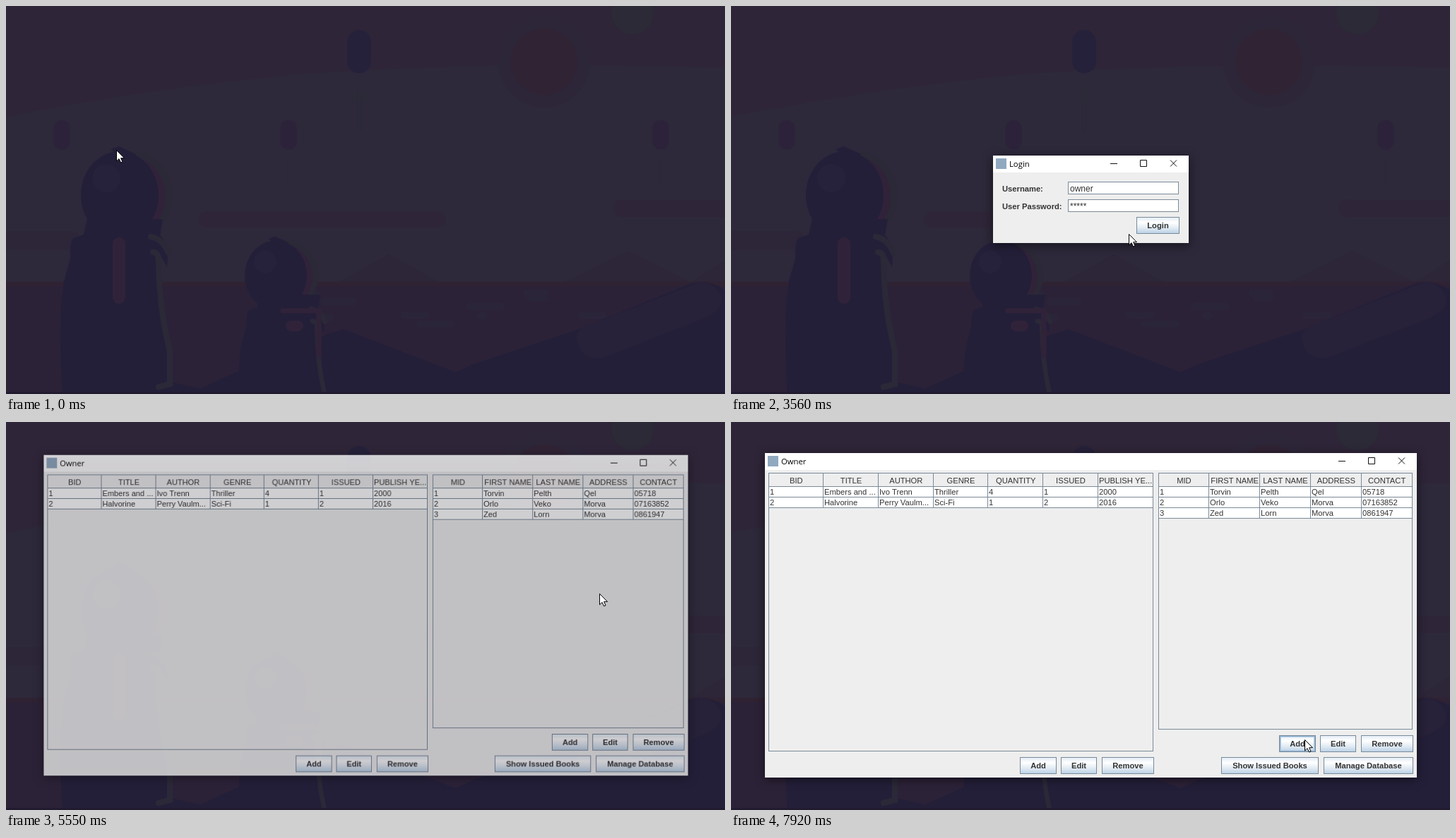
An HTML page with a canvas for the animation above (8000 ms loop, 1018 by 550 pixels).

```html
<!DOCTYPE html>
<html lang="en">
<head>
<meta charset="utf-8">
<title>Library login</title>
<style>
html, body { margin: 0; width: 100%; height: 100%; overflow: hidden; background: #2d293b; }
canvas { display: block; }
</style>
</head>
<body>
<canvas id="stage" width="1018" height="550"></canvas>
<script>
const W = 1018, H = 550, LOOP = 8000;
const BORDER = '#7a8a99', PANEL = '#eeeeee', INK = '#333333';
const SANS = '"Liberation Sans", Arial, sans-serif';
const PLAIN = '11.2px ' + SANS, BOLD = 'bold 11.2px ' + SANS, INPUT = '12px ' + SANS;
const TITLE = '11.3px "Open Sans", "Noto Sans", sans-serif';
const DARK = '#241f39', RIM = '#2b2937', RED = '#302339';

const stage = document.getElementById('stage').getContext('2d');
const makeLayer = () => Object.assign(document.createElement('canvas'), { width: W, height: H }).getContext('2d');
const scene = makeLayer(), layer = makeLayer();
const clamp = (v, lo = 0, hi = 1) => Math.min(hi, Math.max(lo, v));

// ---------- wallpaper ----------
function paintScene(c) {
  let seed = 7;
  const random = (lo, hi) => {
    seed = seed * 16807 % 2147483647;
    return lo + (hi - lo) * seed / 2147483647;
  };
  const fill = (color, d) => { c.fillStyle = color; c.fill(new Path2D(d)); };
  const line = (color, width, d) => {
    c.strokeStyle = color; c.lineWidth = width; c.lineCap = 'round'; c.stroke(new Path2D(d));
  };
  const oval = (color, x, y, rx, ry = rx) => {
    c.fillStyle = color; c.beginPath(); c.ellipse(x, y, rx, ry, 0, 0, 7); c.fill();
  };
  const pill = (color, x, y, w, h) => {
    c.fillStyle = color; c.beginPath(); c.roundRect(x, y, w, h, Math.min(w, h) / 2); c.fill();
  };
  const rocket = (color, x, y, w) => {
    pill(color, x - w / 2, y, w, w * 1.8);
    line('#2c2939', w / 7, `M${x} ${y + w * 2.6}v${w * 1.6}`);
  };
  const hill = (x, y, w) => fill('#2d2538', `M${x - w} 391L${x} ${y}L${x + w} 391Z`);
  const figure = (x, y, size, lean) => {
    c.save();
    c.translate(x, y);
    c.scale(size, size);
    oval(RIM, 16, 0, 59, 62);
    oval(RED, 11, 2, 54, 58);
    oval(DARK, 0, 0, 55, 62);
    oval('#27223b', -19, -24, 20);
    fill(DARK, 'M-13 -65L-1 -69L23 -58L9 -48Z');
    c.translate(lean, 0);
    fill(DARK, 'M-46 34H61L57 57Q71 70 67 102L53 77V102Q59 172 75 225L67 237L75 290H-81Q-88 172 -79 122L-70 90Q-71 60 -63 60L-51 56Z');
    line(RIM, 8, 'M44 59Q61 62 69 82M47 81Q56 81 55 96Q56 162 71 221V268L55 272');
    c.restore();
  };

  c.fillStyle = '#2e2538'; c.fillRect(0, 0, W, H);
  fill('#2d283a', 'M0 157Q200 117 400 98Q560 84 800 84L1018 87V391H0Z');
  oval('#2d2639', 762, 79, 65);
  oval('#302334', 762, 79, 47);
  oval('#2c2a37', 887, 10, 30);
  oval('#2c2a38', 500, 128, 10);
  rocket('#26213a', 500, 34, 34);
  for (const x of [79, 400, 927]) rocket('#2c233a', x, 162, 23);

  pill('#2e2638', 273, 291, 350, 23);
  pill('#2e2538', 860, 274, 200, 25);
  pill('#2d2639', -20, 319, 125, 27);
  hill(542, 352, 70);
  hill(880, 347, 88);
  hill(1040, 347, 70);

  c.fillStyle = '#2c2238'; c.fillRect(0, 391, W, 159);
  c.fillStyle = '#2f2232'; c.fillRect(0, 391, W, 6);
  for (let i = 0; i < 12; i++) pill('#2b253a', random(200, 860), random(395, 450), random(12, 58), 11);

  fill(DARK, 'M230 532L275 542L330 517L455 465L478 458L637 519L660 508L808 459L965 395Q990 385 1018 402V550H230Z');
  fill('#272139', 'M808 469Q810 456 830 450L984 391Q1006 394 1012 412Q1016 430 990 442L845 499Q810 502 808 469Z');

  figure(161, 268, 1, 0);
  pill(RED, 151, 328, 18, 94);
  figure(382, 382, .8, 18);
  line(RED, 7, 'M392 432H443V496');
  pill(RED, 396, 446, 25, 15);
  c.fillStyle = '#221b30'; c.fillRect(0, 547, W, 3);
}

// ---------- widgets ----------
function text(c, s, x, y, font = PLAIN, color = INK, align = 'left') {
  c.font = font; c.fillStyle = color; c.textAlign = align;
  c.fillText(s, x, y);
}

function frame(c, x, y, w, h, color = BORDER) {
  c.strokeStyle = color; c.lineWidth = 1;
  c.strokeRect(x + .5, y + .5, w - 1, h - 1);
}

function box(c, x, y, w, h, fill) {
  c.fillStyle = fill; c.fillRect(x, y, w, h);
  frame(c, x, y, w, h);
}

function button(c, label, x, y, w, tip) {
  const h = 24, shade = c.createLinearGradient(0, y, 0, y + h);
  ['#e1ebf5', '#ffffff', '#e0eaf3', '#b8cfe5'].forEach((color, i) => shade.addColorStop(i / 3, color));
  box(c, x, y, w, h, shade);
  if (tip.x >= x && tip.x < x + w && tip.y >= y && tip.y < y + h) {
    frame(c, x + 1, y + 1, w - 2, h - 2, '#8fb0d0');
    frame(c, x + 2, y + 2, w - 4, h - 4, '#b8cfe5');
  }
  text(c, label, x + w / 2, y + 16, BOLD, INK, 'center');
}

// Lays buttons out from the right edge, each as wide as its label needs.
function buttonRow(c, right, y, tip, ...labels) {
  c.font = BOLD;
  for (const label of labels.reverse()) {
    const w = Math.ceil(c.measureText(label).width * 1.03 + 29);
    button(c, label, Math.floor(right - w), y, w, tip);
    right -= w + 6.5;
    c.font = BOLD;
  }
}

function windowFrame(c, title, x, y, w, h) {
  c.fillStyle = PANEL; c.fillRect(x, y, w, h);
  c.fillStyle = '#ffffff'; c.fillRect(x, y, w, 24);
  c.fillStyle = '#91a9c0'; c.fillRect(x + 4, y + 4, 15, 15);
  text(c, title, x + 23, y + 16, TITLE, '#000000');
  const r = x + w, m = y + 11.5;
  c.strokeStyle = '#111111'; c.lineWidth = 1;
  c.beginPath();
  c.moveTo(r - 111, m); c.lineTo(r - 101, m);
  c.rect(r - 68.5, m - 5, 9, 9);
  c.moveTo(r - 26, m - 5); c.lineTo(r - 17, m + 4);
  c.moveTo(r - 17, m - 5); c.lineTo(r - 26, m + 4);
  c.stroke();
}

function table(c, x, y, w, h, heads, rows) {
  const step = (w - 1) / heads.length, rowH = 15, top = y + 19, bodyH = rows.length * rowH;
  const edge = i => Math.floor(x + i * step);
  frame(c, x, y, w, h);
  c.fillStyle = '#ffffff'; c.fillRect(x + 1, top, w - 2, bodyH);
  c.fillStyle = BORDER;
  for (let r = 0; r <= rows.length; r++) c.fillRect(x, top + r * rowH, w, 1);
  heads.forEach((head, i) => {
    c.fillStyle = BORDER; c.fillRect(edge(i + 1), y, 1, 20 + bodyH);
    text(c, head, x + (i + .5) * step + .5, y + 15, PLAIN, INK, 'center');
    rows.forEach((row, r) => text(c, row[i], edge(i) + 2, top + 12 + r * rowH));
  });
}

function field(c, y, label, value, caret) {
  text(c, label, 384, y + 14, BOLD);
  box(c, 477, y, 157, 18, '#ffffff');
  text(c, value, 480, y + 14, INPUT);
  if (!caret) return;
  c.fillStyle = '#000000';
  c.fillRect(480 + Math.round(c.measureText(value).width), y + 2, 1, 15);
}

// ---------- windows ----------
const keysSince = (t, start, gap) => clamp(Math.floor((t - start) / gap), 0, 5);

// A first password attempt is corrected, erased and typed again.
function starCount(t) {
  if (t < 1610) return 0;
  if (t < 2280) return t < 2010 ? 4 : 3;
  return keysSince(t, 2360, 80);
}

function loginWindow(c, t, tip) {
  windowFrame(c, 'Login', 371, 212, 277, 124);
  const blinkOn = t < 2760 || (t - 2760) % 1000 < 500;
  field(c, 249, 'Username:', 'owner'.slice(0, keysSince(t, 855, 85)), t >= 610 && t < 1350);
  field(c, 274, 'User Password:', '*'.repeat(starCount(t)), t >= 1350 && blinkOn);
  buttonRow(c, 635, 299, tip, 'Login');
}

function mainWindow(c, t, tip) {
  windowFrame(c, 'Owner', 48, 44, 923, 460);
  table(c, 53, 72, 545, 395,
    ['BID', 'TITLE', 'AUTHOR', 'GENRE', 'QUANTITY', 'ISSUED', 'PUBLISH YE...'],
    [['1', 'Embers and ...', 'Ivo Trenn', 'Thriller', '4', '1', '2000'],
     ['2', 'Halvorine', 'Perry Vaulm...', 'Sci-Fi', '1', '2', '2016']]);
  table(c, 605, 72, 360, 364,
    ['MID', 'FIRST NAME', 'LAST NAME', 'ADDRESS', 'CONTACT'],
    [['1', 'Torvin', 'Pelth', 'Qel', '05718'],
     ['2', 'Orlo', 'Veko', 'Morva', '07163852'],
     ['3', 'Zed', 'Lorn', 'Morva', '0861947']]);
  buttonRow(c, 599, 475, tip, 'Add', 'Edit', 'Remove');
  buttonRow(c, 966, 444, tip, 'Add', 'Edit', 'Remove');
  buttonRow(c, 966, 475, tip, 'Show Issued Books', 'Manage Database');
}

// Draws a window as one layer, faded and scaled about its centre by `shown` (0 to 1).
function present(paint, shown, t, tip) {
  if (shown <= 0) return;
  const cx = 509.5, cy = 274, s = .943 + .057 * shown;
  layer.clearRect(0, 0, W, H);
  paint(layer, t, tip);
  stage.save();
  stage.globalAlpha = shown;
  stage.shadowColor = 'rgba(0,0,0,.5)';
  stage.shadowBlur = 14;
  stage.shadowOffsetY = 3;
  stage.translate(cx, cy);
  stage.scale(s, s);
  stage.drawImage(layer.canvas, -cx, -cy);
  stage.restore();
}

// ---------- pointer ----------
const stops = [
  [0, 156, 204], [3150, 156, 204], [3560, 563, 323], [3980, 586, 321], [4460, 586, 321], [5000, 821, 245],
  [5150, 821, 245], [5410, 849, 261], [5550, 840, 243], [5690, 789, 215], [6170, 591, 160], [6600, 850, 451],
  [7200, 640, 106], [7640, 815, 451], [7740, 790, 411], [7920, 812, 450], [LOOP, 812, 450]];

function pointerAt(t) {
  const i = stops.findIndex(stop => stop[0] > t);
  const [t0, x0, y0] = stops[i - 1], [t1, x1, y1] = stops[i];
  const p = (t - t0) / (t1 - t0), e = p * p * (3 - 2 * p);
  return { x: Math.round(x0 + (x1 - x0) * e), y: Math.round(y0 + (y1 - y0) * e) };
}

const arrow = new Path2D('M.5 .5V16L4 12.6L6.6 18L9 17L6.6 11.7H11.5Z');
function drawPointer({ x, y }) {
  stage.save();
  stage.translate(x, y);
  stage.fillStyle = '#ffffff';
  stage.strokeStyle = '#000000';
  stage.fill(arrow);
  stage.stroke(arrow);
  stage.restore();
}

// ---------- timeline ----------
const opening = (t, start) => 1 - (1 - clamp((t - start) / 250)) ** 2.5;
const closing = (t, start) => 1 - clamp((t - start) / 180);

function draw(t) {
  const tip = pointerAt(t);
  stage.drawImage(scene.canvas, 0, 0);
  present(loginWindow, opening(t, 60) * closing(t, 3990), t, tip);
  present(mainWindow, opening(t, 5434), t, tip);
  drawPointer(tip);
}

paintScene(scene);
const start = performance.now();
function tick() {
  draw((performance.now() - start) % LOOP);
  requestAnimationFrame(tick);
}
tick();
</script>
</body>
</html>
```
